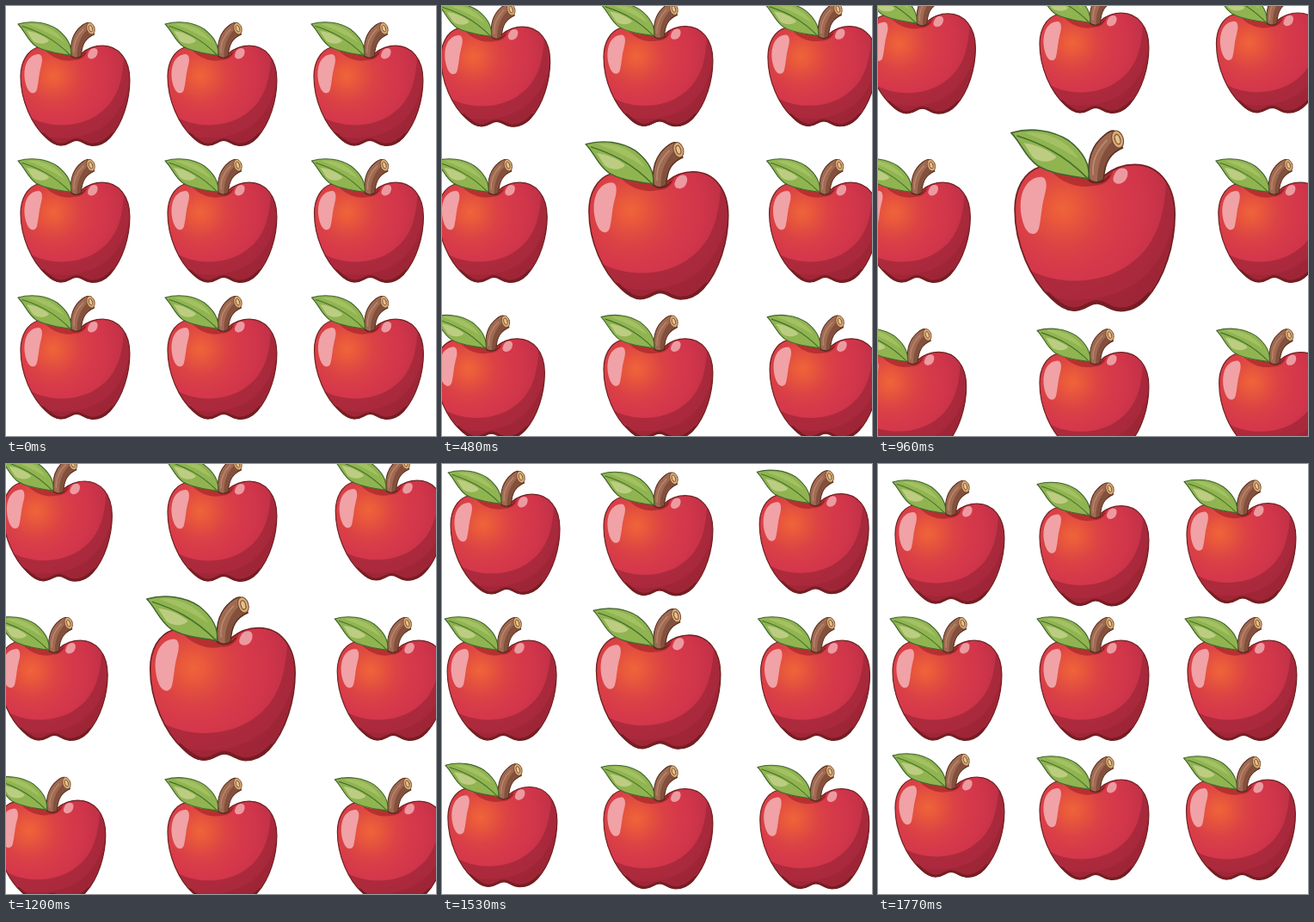
These frames come from a looping animation (500 by 500 pixels, 1800 ms). An HTML page with a canvas:

```html
<!DOCTYPE html>
<html lang="en">
<head>
<meta charset="utf-8">
<title>Apples</title>
<style>
html, body { margin: 0; width: 100%; height: 100%; overflow: hidden; background: #fff; }
canvas { display: block; width: 500px; height: 500px; }
</style>
</head>
<body>
<canvas id="stage" width="500" height="500"></canvas>
<script>
const ctx = document.getElementById('stage').getContext('2d');
const STEP = 30, HALF = 30, LOOP = 1800;

// Each apple: home x, y; drift at the turning point; drift at the end of the loop
const apples = [
  [-171, -159, -33, -40, 3, 0],
  [0, -159, 0, -41, 0, 2.5],
  [170, -159, 38, -41, 1, -0.5],
  [-171, 0, -39.3, 0, 0, 0],
  [170.5, 0, 40, 0, 1.5, 0],
  [-171, 159, -44.5, 41, 3, 0],
  [0, 159, 0, 41, 0, 3],
  [170.5, 159, 41, 41, 0, 3]
];

const body = new Path2D(`M-1 -34 C-14 -45 -30 -46 -42 -43 C-55 -39 -62 -25 -62 -9
  C-62 19 -49 47 -33 61.5 C-26 68.5 -20 71.5 -14 71 C-6 70.5 -3 65.5 3 65.5
  C9 65.5 13 71 21 71.3 C29 71.5 36 68.5 42 62 C57 45.5 64.9 18 64.9 -5
  C64.9 -29 52 -44.8 33 -44.8 C22 -44.8 15 -41 9 -36 Z`);
const shade = new Path2D(`M-50 39 C-27 51 4 50 25 37 C46 24 56 5 58 -31
  C62 -38 72 -30 72 -5 L72 78 L-30 78 Z`);
const deep = new Path2D(`M-34 60 C-10 66 18 62 38 46 C54 33 61 14 65 -2
  L72 0 L72 78 L-30 78 Z`);
const under = new Path2D(`M-36 59 C-26 68.5 -20 71.5 -14 71 C-6 70.5 -3 65.5 3 65.5
  C9 65.5 13 71 21 71.3 C29 71.5 36 68.5 45 59`);
const hollow = new Path2D('M-33 -39 C-22 -28 -9 -26 0 -28 C9 -28 14 -32 16 -40 L5 -44 Z');
const rim = new Path2D('M-4 -33 C0 -29 8 -29 13 -36');
const shineL = new Path2D(`M-41.5 -35 C-36.5 -35 -36 -28 -38.5 -20 C-41 -11 -41 -2 -43 6
  C-45 12.5 -51.5 11.5 -54.5 4 C-61 -13 -57 -34 -41.5 -35 Z`);
const shineR = new Path2D('M23.5 -42 C28.5 -42 28.5 -36 25.5 -32 C22 -28 15.5 -29 16 -34 C17 -38 19 -42 23.5 -42 Z');
const stem = new Path2D(`M-3 -33 C-5 -48 -1 -60 9 -68 C12 -70.5 14 -72 17 -71.5
  L23.5 -58 C14 -54 9 -47 8.5 -33 C5 -30 0 -30 -3 -33 Z`);
const stemDark = new Path2D('M15 -63 C8 -56 3 -45 3.5 -31 L8.5 -33 C9 -47 14 -54 23.5 -58 Z');
const grain = new Path2D('M0 -37 C-1 -48 4 -57 11 -64');
const leaf = new Path2D(`M-65 -70 C-49 -74.5 -32 -72 -19.5 -64 C-8 -55 -2 -45 -3.5 -33.5
  C-17 -36 -33 -37 -44 -44 C-54 -51 -57 -62 -65 -70 Z`);
const leafLow = new Path2D(`M-65 -70 C-47 -63 -28 -57 -3.5 -33.5 C-17 -36 -33 -37 -44 -44
  C-54 -51 -57 -62 -65 -70 Z`);
const leafShine = new Path2D('M-55 -62 C-46 -61 -36 -57 -29 -51 C-32 -46 -43 -46 -48 -51 Z');
const leafGlow = new Path2D('M-54 -70 C-38 -72 -20 -64 -11 -49 C-25 -58 -38 -64 -54 -70 Z');
const rib = new Path2D('M-60 -67.5 C-43 -62 -24 -54 -4 -33.5');

function radial(x, y, r, ...stops) {
  const g = ctx.createRadialGradient(x, y, 0, x, y, r);
  stops.forEach(([at, color]) => g.addColorStop(at, color));
  return g;
}

const skin = radial(-24, -10, 88,
  [0, '#ee643a'], [0.1, '#eb5b3b'], [0.22, '#e34f3f'], [0.36, '#db4245'],
  [0.55, '#d6394a'], [0.75, '#d0354a'], [1, '#bd3046']);

function fill(path, color) {
  ctx.fillStyle = color;
  ctx.fill(path);
}

function line(path, color, width) {
  ctx.strokeStyle = color;
  ctx.lineWidth = width;
  ctx.stroke(path);
}

function cutEnd() {
  ctx.save();
  ctx.translate(19.5, -64.8);
  ctx.rotate(-0.3);
  [[4.5, 7, '#d9ae78'], [2.1, 4, '#e6c28c']].forEach(([rx, ry, color]) => {
    ctx.beginPath();
    ctx.ellipse(0, 0, rx, ry, 0, 0, Math.PI * 2);
    ctx.fillStyle = color;
    ctx.fill();
    ctx.strokeStyle = '#74472d';
    ctx.lineWidth = 0.8;
    ctx.stroke();
  });
  ctx.restore();
}

function drawApple(x, y, scale) {
  ctx.save();
  ctx.translate(x, y);
  ctx.scale(scale, scale);
  ctx.lineJoin = ctx.lineCap = 'round';

  fill(body, skin);
  ctx.save();
  ctx.clip(body);
  fill(shade, 'rgba(160, 38, 56, 0.72)');
  fill(deep, 'rgba(146, 34, 48, 0.4)');
  line(under, 'rgba(112, 26, 32, 0.8)', 5);
  fill(hollow, 'rgba(166, 38, 40, 0.7)');
  ctx.restore();
  fill(shineL, '#f0a2a6');
  fill(shineR, '#ec9aa0');
  line(body, '#6e2222', 1.2);
  line(rim, '#6a1c1e', 1);

  fill(stem, '#a06a52');
  fill(stemDark, '#83503d');
  line(grain, '#b98a70', 1.2);
  line(stem, '#57301f', 1.1);
  cutEnd();

  fill(leaf, '#90b450');
  fill(leafLow, '#8fb450');
  fill(leafGlow, '#a3c163');
  fill(leafShine, '#bccd82');
  line(rib, '#44702c', 1.1);
  line(leaf, '#41652f', 1.1);
  ctx.restore();
}

function render(ms) {
  const frame = Math.floor((ms % LOOP) / STEP);
  const back = frame >= HALF;
  const out = (back ? 2 * HALF - 1 - frame : frame) / (HALF - 1);

  ctx.fillStyle = '#fff';
  ctx.fillRect(0, 0, 500, 500);
  for (const [x, y, px, py, ex, ey] of apples) {
    const rest = back ? 1 - out : 0;
    drawApple(250 + x + px * out + ex * rest, 250 + y + py * out + ey * rest, 1);
  }
  drawApple(250, 250, 1 + 0.5 * out);
}

const start = performance.now();
function tick() {
  render(performance.now() - start);
  requestAnimationFrame(tick);
}
tick();
</script>
</body>
</html>
```
